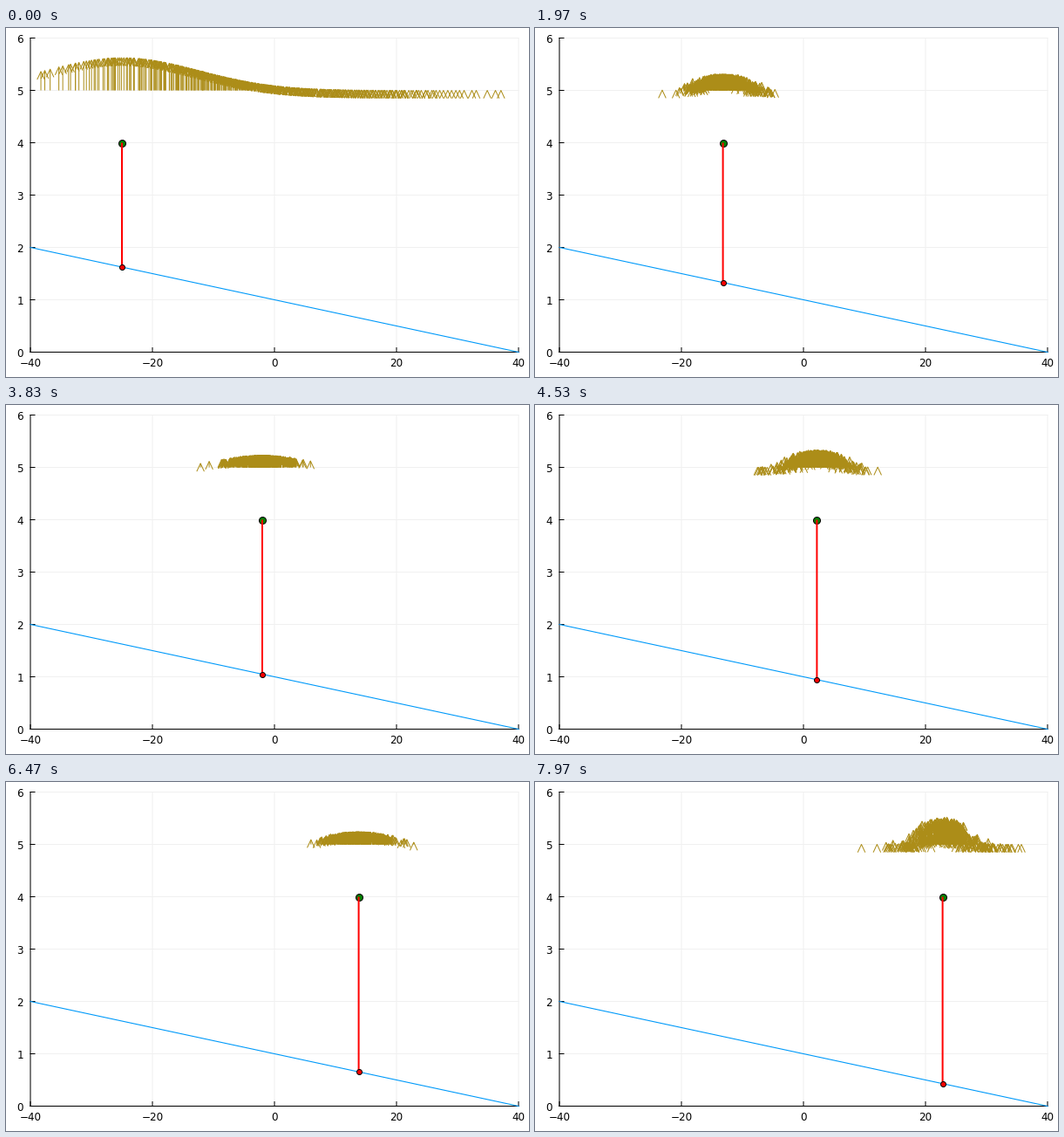
A matplotlib script that plays this animation: 600x400 px, repeating every 8000 ms.

```python
import numpy as np
import matplotlib.pyplot as plt
from matplotlib.animation import FuncAnimation
from matplotlib.collections import LineCollection
from matplotlib.patches import Rectangle

plt.rcParams["path.snap"] = False

STEPS, LOOP_MS, TICK_MS = 240, 8000, 20
PX = 0.72                       # one pixel in points at 100 dpi
LEFT, RIGHT, TOP, BOTTOM = 28, 588, 11.5, 371.5
COUNT = 400                     # particles
START, SPEED = -25, 0.2         # drone position and move per step
DRIFT_NOISE, SENSOR_VAR = 0.5, 0.1
RESAMPLE = {1, 7, 40, 112, 188}
ARROW_SCALE = 0.21


def sx(x):
    return LEFT + 7 * (x + 40)


def sy(y):
    return BOTTOM - 60 * y


def ground(x):
    return 1 - x / 40


def drone(i):
    return START + SPEED * i


def weigh(weights, x, i):
    error = ground(x) - ground(drone(i))
    weights = weights * np.exp(-error ** 2 / (2 * SENSOR_VAR))
    return weights / weights.mean()


def simulate():
    """Particle positions and weights for every step."""
    rng = np.random.default_rng(11)
    ranks = (np.arange(COUNT) + 0.5) / COUNT
    pool = rng.normal(-2.5, 16.5, COUNT * 20)
    pool = np.sort(pool[(pool > -39.2) & (pool < 37.8)])
    x = np.quantile(pool, ranks) + rng.uniform(-0.25, 0.25, COUNT)
    weights = weigh(np.ones(COUNT), x, 0)
    history = [(x, weights)]
    for i in range(1, STEPS):
        if i in RESAMPLE:
            picks = np.searchsorted(np.cumsum(weights) / COUNT, ranks)
            x = x[np.minimum(picks, COUNT - 1)]
            weights = np.ones(COUNT)
        x = x + SPEED + rng.normal(0, DRIFT_NOISE, COUNT)
        weights = weigh(weights, x, i)
        history.append((x, weights))
    return history


def arrows(x, weights):
    px, base = sx(x), np.full(COUNT, sy(5.0))
    tip = sy(5 + ARROW_SCALE * weights)
    shafts = np.stack([np.c_[px, base], np.c_[px, tip]], axis=1)
    heads = np.stack([np.c_[px - 4.3, tip + 9.2], np.c_[px, tip],
                      np.c_[px + 4.3, tip + 9.2]], axis=1)
    return list(shafts) + list(heads)


fig = plt.figure(figsize=(6, 4), dpi=100, facecolor="white")
ax = fig.add_axes([0, 0, 1, 1])
ax.set_xlim(0, 600)
ax.set_ylim(400, 0)
ax.axis("off")


def stroke(x, y, color="black", width=1, z=2, **style):
    return ax.plot(x, y, color=color, lw=width * PX, zorder=z, **style)[0]


def marker(color, size, z):
    return ax.plot([], [], "o", color=color, ms=size * PX, mec="black",
                   mew=PX, zorder=z)[0]


def label(x, y, value, ha, va):
    ax.text(x, y, str(value).replace("-", "\u2212"), ha=ha, va=va,
            fontsize=12 * PX, family="DejaVu Sans")


for v in range(-40, 41, 20):
    stroke([sx(v)] * 2, [TOP, BOTTOM], "#f0f0f0", z=1)
    stroke([sx(v)] * 2, [BOTTOM, BOTTOM - 5])
    label(sx(v), 387.5, v, "center", "baseline")
for v in range(7):
    stroke([LEFT, RIGHT], [sy(v)] * 2, "#f0f0f0", z=1)
    stroke([LEFT, LEFT + 5], [sy(v)] * 2)
    label(20, sy(v) + 0.5, v, "right", "center_baseline")
stroke([LEFT, LEFT], [TOP, BOTTOM])
stroke([LEFT, RIGHT], [BOTTOM, BOTTOM])
stroke([LEFT, RIGHT], [sy(2), sy(0)], "#009afa", 1.1, 3)

swarm = LineCollection([], colors="#ac8d18", linewidths=PX, zorder=4)
ax.add_collection(swarm, autolim=False)
swarm.set_clip_path(Rectangle((LEFT, TOP), RIGHT - LEFT, BOTTOM - TOP,
                              transform=ax.transData))
body = marker("#008000", 8, 5)
beam = stroke([], [], "red", 2, 6, solid_capstyle="butt")
spot = marker("red", 6, 7)

history = simulate()


def update(tick):
    # the steps last 30, 40 and 30 ms in turn
    i = min((3 * (tick * TICK_MS // 10 + 1) + 1) // 10, STEPS - 1)
    x = drone(i)
    px, bottom = sx(x), sy(ground(x))
    swarm.set_segments(arrows(*history[i]))
    body.set_data([px], [sy(4)])
    beam.set_data([px, px], [sy(4), bottom])
    spot.set_data([px], [bottom])
    return swarm, body, beam, spot


anim = FuncAnimation(fig, update, frames=LOOP_MS // TICK_MS, interval=TICK_MS,
                     init_func=lambda: update(0), repeat=True, repeat_delay=0)
plt.show()
```
